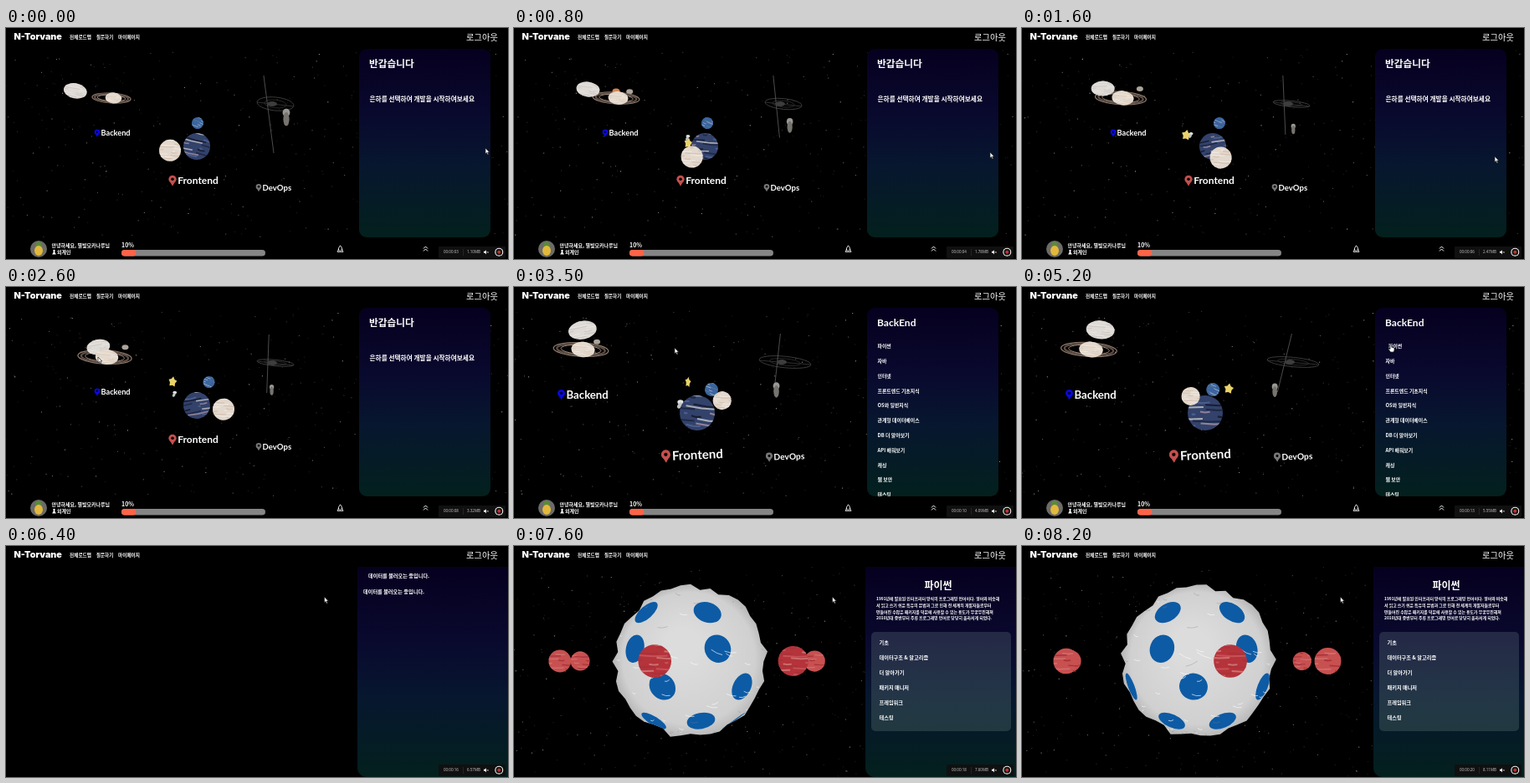
Animation of 600x277 px, one loop 8.3 s. Source, as an HTML page with a canvas:

```html
<!DOCTYPE html>
<html lang="ko">
<head>
<meta charset="utf-8">
<style>
html, body { margin: 0; height: 100%; overflow: hidden; background: #000; }
canvas { display: block; width: 600px; height: 277px; }
</style>
</head>
<body>
<canvas id="stage" width="600" height="277"></canvas>
<script>
const c = document.getElementById('stage').getContext('2d');
const LOOP = 8300, STEP = 100, PANEL_SWAP = 2.7, LOADING = 5.5, LOADED = 6.9;
const KR = '"Noto Sans CJK KR", "Noto Sans CJK", "Noto Sans", sans-serif';
const LATIN = 'Lato, "Open Sans", sans-serif';
const RAD = Math.PI / 180, TAU = Math.PI * 2;
const { sin, cos, exp, abs, max, min, sqrt } = Math;

let seed = 11;
const rnd = () => (seed = (seed * 16807) % 2147483647) / 2147483647;
const many = (n, make) => Array.from({ length: n }, (_, i) => make(i));
const mix = (a, b, k) => a + (b - a) * k;
const ease = k => (k = min(1, max(0, k)), k * k * (3 - 2 * k));

const stars = many(520, () => ({ x: rnd() * 640, y: 25 + rnd() * 252, a: 0.14 + rnd() ** 4 * 0.7, v: 2 + rnd() * 8 }));
const bumps = many(130, () => ({ lon: rnd() * 360, lat: Math.asin(rnd() * 2 - 1) / RAD, len: 3 + rnd() * 6, tilt: rnd() - 0.5, light: rnd() > 0.35 }));
const rim = many(48, () => 86.5 + rnd() * 7);
// Rows of five evenly spaced patches: latitude, first longitude.
const patchRows = [[42, 18], [10, 22], [-20, -24], [-54, 14]];
const redAngles = [-104, -80, -10.5, 35, 90];
// Cursor stops: time, x, y.
const stops = [[0, 573, 144], [1.6, 565, 154], [2.4, 110, 84], [2.9, 110, 84], [3.5, 192, 73],
  [4.2, 440, 90], [4.8, 440, 69], [5.3, 440, 69], [5.8, 380.5, 61], [9, 380.5, 61]];

const topics = ['파이썬', '자바', '인터넷', '프론트엔드 기초지식', 'OS와 일반지식', '관계형 데이터베이스',
  'DB 더 알아보기', 'API 배워보기', '캐싱', '웹 보안', '테스팅'];
const chapters = ['기초', '데이터구조 & 알고리즘', '더 알아가기', '패키지 매니저', '프레임워크', '테스팅'];
const summary = ['1991년에 발표된 인터프리터 방식의 프로그래밍 언어이다. 영어와 비슷해',
  '서 읽고 쓰기 쉬운 특유의 문법과 그로 인해 전 세계의 개발자들로부터',
  '만들어진 수많은 패키지를 덕분에 사용할 수 있는 용도가 무궁무진해져',
  '2010년대 중반부터 주류 프로그래밍 언어로 당당히 올라서게 되었다.'];

function text(s, x, y, size, { weight = 700, color = '#fff', family = KR, align = 'left' } = {}) {
  c.font = `${weight} ${size}px ${family}`;
  c.fillStyle = color;
  c.textAlign = align;
  c.textBaseline = 'middle';
  c.fillText(s, x, y);
}
function oval(x, y, rx, ry, fill, rot = 0) {
  c.beginPath();
  c.ellipse(x, y, rx, ry, rot, 0, TAU);
  c.fillStyle = fill;
  c.fill();
}
function ring(x, y, rx, ry, rot, color, width) {
  c.beginPath();
  c.ellipse(x, y, rx, ry, rot, 0, TAU);
  c.strokeStyle = color;
  c.lineWidth = width;
  c.stroke();
}
function box(x, y, w, h, radius, fill) {
  c.beginPath();
  c.roundRect(x, y, w, h, radius);
  c.fillStyle = fill;
  c.fill();
}
function line(points, color, width = 1) {
  c.beginPath();
  points.forEach(([x, y]) => c.lineTo(x, y));
  c.strokeStyle = color;
  c.lineWidth = width;
  c.stroke();
}
function shape(points, fill, outline) {
  c.beginPath();
  points.forEach(([x, y]) => c.lineTo(x, y));
  c.closePath();
  c.fillStyle = fill;
  c.fill();
  if (outline) { c.strokeStyle = outline; c.lineWidth = 0.7; c.stroke(); }
}
// A sphere with thin, broken latitude streaks.
function ball(x, y, rx, ry, rot, base, streaks, phase = 0) {
  c.save();
  c.translate(x, y);
  c.rotate(rot);
  oval(0, 0, rx, ry, base);
  c.clip();
  for (let i = 0; i < 16; i++) {
    const mid = rx * sin(i * 2.4 + phase), half = rx * (0.5 + 0.4 * sin(i * 5.3)), by = ry * (i / 7.5 - 1);
    line([[mid - half, by], [mid, by + ry * 0.04], [mid + half, by]], streaks[i % streaks.length], ry * 0.1);
  }
  c.restore();
}

function drawStars(t) {
  for (const s of stars) {
    c.fillStyle = `rgba(220,220,210,${s.a})`;
    c.fillRect((s.x + s.v * t) % 640 - 20, s.y, 1, 1);
  }
}

function pin(label, color, from, to, k) {
  const [x, y, size, h, rot] = from.map((v, i) => mix(v, to[i], k));
  c.save();
  c.translate(x, y);
  c.rotate(rot);
  shape([[-h * 0.34, -h * 0.05], [h * 0.34, -h * 0.05], [0, h * 0.52]], color);
  oval(0, -h * 0.14, h * 0.37, h * 0.37, color);
  oval(0, -h * 0.14, h * 0.14, h * 0.14, '#000');
  text(label, h * 0.5, 0.5, size, { family: LATIN });
  c.restore();
}

// How far small companions have come out from behind their planet, 0 to 1.
const peek = t => sqrt(max(0, sin(Math.PI * t / 4.3)));

function backendGalaxy(t, k) {
  const w = 35 - 11 * exp(-t / 1.3);
  const x = 126 - 8 * min(1, t / 1.6) - 38 * k, y = 84 - 9 * k;
  oval(x + w * 0.75 * peek(t), y - w * 0.36 * peek(t), 4, 3, '#aaa49a');
  ring(x, y, w * 0.96, w * 0.24, 0.06, '#8d7a6c', 1.3);
  ring(x, y, w * 0.84, w * 0.2, 0.06, '#5d4d45', 2.4);
  ring(x, y, w * 0.7, w * 0.16, 0.06, '#a58f80', 1);
  ball(x + w * (0.8 - 2.6 * exp(-t / 2.8)), y - w * (0.36 + 0.32 * k), 14 + 3 * k, 9 + 2 * k, 0.2 * cos(t), '#dedad6', ['#e8e4e0', '#cfc8c4']);
  oval(x, y - 8 * max(0, sin(t * 2)), 4.5, 3.5, '#d78552');
  ball(x + 2.5, y, w * 0.41, w * 0.27, 0.1, '#e4d9cc', ['#f0e8df', '#dccdbe']);
}

function frontendGalaxy(t, k) {
  const x = mix(228, 219, k), y = mix(142, 151, k), r = mix(16, 21, k);
  const star = { x: x - 33 * sin(0.8 * t), y: y - 19 + 19 * cos(0.8 * t), w: 3.5 + 2.5 * abs(sin(0.9 * t)) };
  const orbit = (54 * t - 160) * RAD;
  const bot = { x: x - 27 * peek(t), y: y - 14 * peek(t), r: 4 + 2 * k };
  ball(x + 9 - 8 * cos(0.9 * t), y - 28, 7 + k, 7 + k, 0.4, '#3c659f', ['#a5b8cf', '#35609e', '#5d7896'], t);
  shape(many(10, i => {
    const s = i % 2 ? 0.62 : 1, a = i * TAU / 10 - 1.4;
    return [star.x + cos(a) * star.w * s, star.y + sin(a) * 6.5 * s];
  }), '#ead36a');
  oval(bot.x, bot.y - bot.r * 0.45, bot.r * 0.6, bot.r * 0.45, '#e2e2e2');
  oval(bot.x - 1, bot.y + bot.r * 0.25, bot.r * 0.4, bot.r * 0.65, '#bfc4c4', 0.5);
  ball(x, y, r, r, 0.25 * cos(1.5 * t), '#33426b', ['#a9adb5', '#1f2944', '#8f8199', '#4a5f8f', '#171d33'], t);
  ball(x + 34 * cos(orbit), y - 14 * sin(orbit) - 8 * k, 13 - 2 * k, 13 - 2 * k, 0.05, '#e3d8cd', ['#eee8df', '#d6c2b2'], t);
}

function spaceStation(t, k) {
  const x = 322 + 2 * k, y = 91 - k, rx = 22 + 9 * k, swing = cos(1.5 * t);
  const top = [x - 14 + 2.4 * t, y - 34], foot = [x - 2 - 3.2 * t, y + 36 + 23 * exp(-2 * t)];
  const fx = x + 13 - 6.7 * t, fy = y + 33 - 18 * exp(-t), fh = 8.5 + 2.5 * swing;
  ring(x, y, rx, 5.5 + 2.5 * swing, 0.1, '#4a4a4a', 0.8);
  ring(x, y, rx * 0.6, 3.3 + 1.5 * swing, 0.1, '#303030', 0.8);
  line([top, foot], '#606060', 0.8);
  line([[x - rx, y - 2], [x + rx, y + 3]], '#3c3c3c', 0.8);
  oval(x - 4, y, 6, 3, '#3d3d3d');
  oval(fx, fy - fh * 0.4, fh * 0.4, fh * 0.45, '#9a9894');
  oval(fx, fy + fh * 0.3, fh * 0.33, fh * 0.75, '#777470');
}

function panelFill(bottom) {
  const g = c.createLinearGradient(0, 25, 0, bottom);
  g.addColorStop(0, '#06001f');
  g.addColorStop(0.35, '#09092e');
  g.addColorStop(0.62, '#07172f');
  g.addColorStop(1, '#03201d');
  return g;
}

function mapPanel(t, mouse) {
  box(422, 25, 157, 226, 9, panelFill(251));
  if (t < PANEL_SWAP) {
    text('반갑습니다', 434, 43, 11.7);
    text('은하를 선택하여 개발을 시작하여보세요', 434.5, 85.5, 7.7);
    return;
  }
  text('BackEnd', 434, 43, 12, { family: LATIN });
  c.save();
  c.beginPath();
  c.rect(422, 25, 157, 226);
  c.clip();
  topics.forEach((topic, i) => {
    const y = 71 + i * 17.8, hover = mouse.x > 432 && abs(mouse.y + 2 - y) < 8;
    text(topic, hover ? 438 : 434.5, y, 5.9);
  });
  c.restore();
}

function statusBar() {
  c.fillStyle = '#000';
  c.fillRect(0, 251, 600, 26);
  oval(39, 265, 10, 10, '#6b6b68');
  oval(39, 262, 4, 6, '#5c8a3c');
  oval(39, 267, 5, 6, '#e3b93c');
  text('안녕하세요, 별빛모카나루님', 54.5, 261, 6);
  oval(57.5, 267, 1.2, 1.2, '#fff');
  shape([[57.5, 267], [59.8, 271.5], [55.2, 271.5]], '#fff');
  text('외계인', 61, 269, 6);
  text('10%', 138, 260.5, 7);
  box(138, 266, 172, 7.5, 4, '#858585');
  box(138, 266, 17.5, 7.5, 4, '#ff6347');
  line([[397.5, 267], [397.5, 264], [399.5, 260.8], [401.5, 264], [401.5, 267], [397.5, 267]], '#eee', 0.9);
  line([[397.5, 265], [396, 268.5], [403, 268.5], [401.5, 265]], '#eee', 0.8);
  for (const y of [264.5, 267.5]) line([[499, y], [501.5, y - 2.5], [504, y]], '#fff', 1);
}

function galaxyMap(t, mouse) {
  const k = ease((t - 2.6) / 0.7);
  drawStars(t);
  backendGalaxy(t, k);
  spaceStation(t, k);
  frontendGalaxy(t, k);
  pin('Backend', '#0808e0', [109, 126, 9.2, 9, 0], [56.5, 129, 13.2, 12, 0], k);
  pin('Frontend', '#c4504e', [199, 183, 12, 12.5, 0], [181.5, 203, 15, 15, -0.045], k);
  pin('DevOps', '#777', [302, 191.5, 9.6, 9, 0], [305, 204, 10.2, 11, -0.03], k);
  statusBar();
  mapPanel(t, mouse);
}

function onSphere(lon, lat, r) {
  const a = lon * RAD, b = lat * RAD;
  return { x: r * cos(b) * sin(a), y: -r * sin(b), z: cos(b) * cos(a) };
}

function redMoon({ x, r, z }) {
  ball(x, 138, r, r, 0.02, z > 0.8 ? '#b5333a' : '#c8504f', ['#cf7071', '#a9323a', '#c65256'], x / 25);
}

function bigPlanet(spin) {
  c.save();
  c.translate(211, 138.5);
  const g = c.createRadialGradient(-10, -20, 20, 0, 0, 94);
  g.addColorStop(0, '#dcdcdc');
  g.addColorStop(0.8, '#d0d0d0');
  g.addColorStop(1, '#b4b4b4');
  shape(rim.map((r, i) => {
    const a = i * TAU / rim.length + spin * RAD * 0.3;
    return [r * cos(a), r * sin(a)];
  }), g);
  c.clip();
  for (const [lat, first] of patchRows) {
    for (let i = 0; i < 5; i++) {
      const p = onSphere(first + i * 72 + spin, lat, 88);
      if (p.z > 0) oval(p.x, p.y, 17 * p.z, 17, '#0d5ba5', Math.atan2(p.y, p.x));
    }
  }
  for (const b of bumps) {
    const p = onSphere(b.lon + spin, b.lat, 89);
    if (p.z < 0.05) continue;
    const w = b.len * p.z;
    line([[p.x - w, p.y - b.tilt * w], [p.x, p.y + 1], [p.x + w, p.y + b.tilt * w]], b.light ? 'rgba(250,250,250,.65)' : 'rgba(130,130,130,.35)', 1);
  }
  c.restore();
}

function planetPage(t) {
  drawStars(t);
  const spin = (t - 7.6) * 33;
  const moons = redAngles.map(deg => {
    const a = (deg + spin) * RAD, z = cos(a), depth = 2.67 - z;
    return { x: 211 + 396 * sin(a) / depth, r: 33.4 / depth, z };
  }).sort((a, b) => a.z - b.z);
  moons.filter(m => m.z < 0).forEach(redMoon);
  bigPlanet(spin);
  moons.filter(m => m.z >= 0).forEach(redMoon);
}

function topicPanel(loaded) {
  box(420, 25, 180, 252, [0, 0, 0, 11], panelFill(277));
  if (!loaded) {
    text('데이터를 불러오는 중입니다.', 433, 35.5, 6.2);
    text('데이터를 불러오는 중입니다.', 427, 55, 6.2);
    return;
  }
  text('파이썬', 507, 47, 12, { align: 'center' });
  summary.forEach((s, i) => text(s, 433, 63.5 + i * 7.7, 4.93));
  box(427, 103, 167, 119, 5, 'rgba(160,195,175,.18)');
  chapters.forEach((s, i) => text(s, 436.5, 116 + i * 18, 6.2));
}

function header() {
  c.fillStyle = '#000';
  c.fillRect(0, 0, 600, 25);
  text('N-Torvane', 9.5, 11, 10.8, { weight: 900, family: 'Inter, sans-serif' });
  text('전체로드맵', 76, 10.5, 5.65);
  text('질문하기', 108, 10.5, 5.5);
  text('마이페이지', 134, 10.5, 5.65);
  text('로그아웃', 550, 11, 10.3, { weight: 400 });
}

function recorder(t) {
  const seconds = Math.floor(3.2 + 2.05 * t + 1e-6);
  const style = { weight: 400, color: '#ccc', family: '"Open Sans", sans-serif' };
  box(517, 262, 80, 14, 1, '#101010');
  text(`00:00:${String(seconds).padStart(2, '0')}`, 523, 269, 4.5, style);
  c.fillStyle = '#333';
  c.fillRect(546, 265, 0.6, 8);
  text(`${(1.1 + 0.855 * t).toFixed(2)}MB`, 551, 269, 4.5, style);
  shape([[571, 267.8], [572.4, 267.8], [574, 266.2], [574, 271.4], [572.4, 269.8], [571, 269.8]], '#eee');
  line([[574.8, 268], [576.6, 269.8]], '#eee', 0.6);
  line([[574.8, 269.8], [576.6, 268]], '#eee', 0.6);
  oval(589.3, 268.7, 5, 5, '#f4f4f4');
  oval(589.3, 268.7, 3.9, 3.9, '#151515');
  oval(589.3, 268.7, 2, 2, '#c8302c');
}

function mouseAt(t) {
  const i = stops.findIndex(s => s[0] > t), [t0, x0, y0] = stops[i - 1], [t1, x1, y1] = stops[i];
  const k = ease((t - t0) / (t1 - t0));
  return { x: mix(x0, x1, k), y: mix(y0, y1, k) };
}
function cursor({ x, y }, hand) {
  c.save();
  c.translate(x, y);
  if (hand) {
    shape([[0, 0], [1.5, 0], [1.7, 3.2], [5, 4], [5, 7], [4, 9], [0.5, 9], [-2, 5.5], [-1, 4.8], [0, 5.6]], '#fff', '#222');
  } else {
    shape([[0, 0], [0, 6.8], [1.5, 5.4], [2.6, 8], [3.8, 7.5], [2.7, 5], [4.8, 5]], '#fff', '#222');
  }
  c.restore();
}

function draw(t) {
  const mouse = mouseAt(t);
  c.fillStyle = '#000';
  c.fillRect(0, 0, 600, 277);
  if (t < LOADING) {
    galaxyMap(t, mouse);
  } else {
    if (t >= LOADED) planetPage(t);
    topicPanel(t >= LOADED);
  }
  header();
  recorder(t);
  cursor(mouse, t > PANEL_SWAP && t < LOADING && mouse.x > 432);
}

function frame() {
  draw(Math.floor(performance.now() % LOOP / STEP) * STEP / 1000);
  requestAnimationFrame(frame);
}
frame();
</script>
</body>
</html>
```
